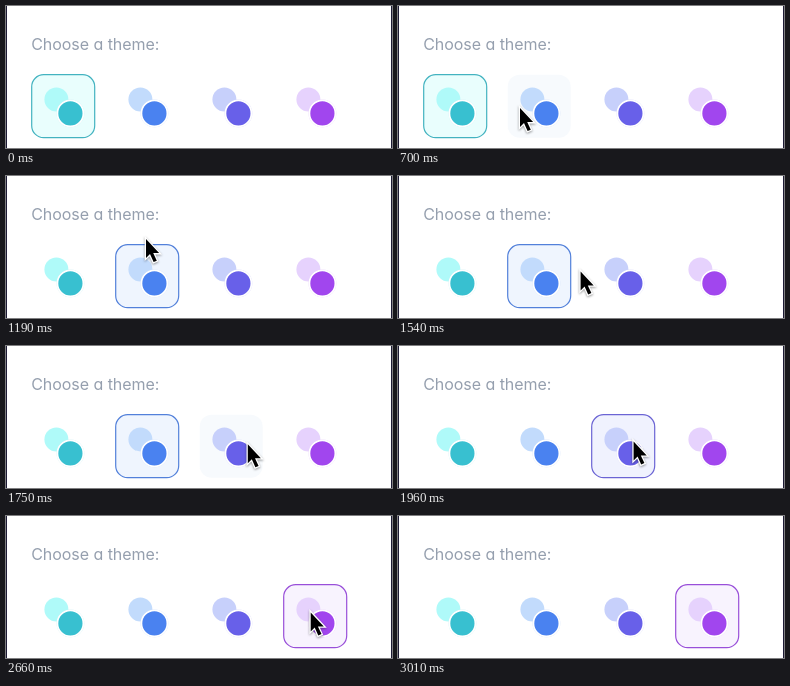
Animation of 386 by 142 pixels, one loop 3990 ms. Source, as an HTML page:

```html
<!DOCTYPE html>
<html lang="en">
<head>
<meta charset="utf-8">
<title>Theme picker</title>
<style>
  html, body { margin: 0; width: 100%; height: 100%; overflow: hidden; background: #fff; }
  svg { display: block; width: 386px; height: 142px; }
  text { font: 16px Inter, sans-serif; font-feature-settings: "cv11"; letter-spacing: -.05px; fill: #959fae; }
  .box { fill: none; }
  .hover .box { fill: #f7fafd; }
  .picked .box {
    fill: color-mix(in srgb, var(--pale) 27%, white);
    stroke: color-mix(in srgb, var(--dark) 82%, #777);
    stroke-width: 1.2;
  }
  .pale { fill: var(--pale); }
  .dark {
    fill: var(--dark); stroke: #fff; stroke-width: 1.8;
    filter: drop-shadow(.8px .8px .7px color-mix(in srgb, var(--dark) 30%, transparent));
  }
  #cursor { stroke: #fff; stroke-width: 2.6; paint-order: stroke; filter: drop-shadow(.5px 1px 1px #0006); }
</style>
</head>
<body>
<svg viewBox="0 0 386 142">
  <path d="M.5 0V142M385.5 0V142" stroke="#1d1b35"/>
  <text x="25.2" y="43.7">Choose a theme:</text>
  <g id="cards"></g>
  <path id="cursor" d="M0 0V19l4-3.9 3.6 8 3.2-1.4-3.6-7.6h5.9z"/>
</svg>
<script>
const LOOP = 3990, STEP = 70, GLIDE = 140;
const LEFT = 25.4, TOP = 68.4, SIZE = 63, PITCH = 84;
const themes = [['#affaf9', '#38c0d0'], ['#c2dbfc', '#4a82f0'], ['#c7d0fb', '#6860e9'], ['#e6d2fd', '#a146ee']];
const clicks = [1050, 1960, 2380];

// arrival time and tip of the pointer; it rests between glides
const stops = [
  [70, 215, 114], [140, 122, 102], [840, 141.5, 99],
  [1190, 140, 63], [1470, 140, 63], [1540, 182.6, 95.4], [1680, 248, 101], [1820, 235.6, 95.4],
  [2100, 260, 62], [2240, 307.7, 94.4],
  [2520, 312, 62], [2660, 304.7, 96.4], [2800, 283, 115], [2940, 258, 131]
];

const cursor = document.getElementById('cursor');
const cards = document.getElementById('cards');
cards.innerHTML = themes.map(([pale, dark], i) => `
  <g transform="translate(${LEFT + i * PITCH} ${TOP})" style="--pale:${pale};--dark:${dark}">
    <rect class="box" x=".3" y=".3" width="${SIZE}" height="${SIZE}" rx="12"/>
    <circle class="pale" cx="25" cy="25" r="12"/>
    <circle class="dark" cx="39" cy="39" r="13"/>
  </g>`).join('');

function pointer(t) {
  const next = stops.findIndex(([arrival]) => arrival >= t);
  if (next < 0 || t < stops[0][0]) return null;
  const [end, x, y] = stops[next];
  const [begin, x0, y0] = stops[Math.max(0, next - 1)];
  const span = Math.min(GLIDE, end - begin) || 1;
  const k = Math.max(0, 1 - (end - t) / span);
  return [x0 + (x - x0) * k, y0 + (y - y0) * k];
}

function draw(now) {
  const t = Math.floor(now % LOOP / STEP) * STEP;
  const tip = pointer(t);
  const picked = clicks.filter(click => click <= t).length;

  cursor.style.display = tip ? '' : 'none';
  if (tip) cursor.setAttribute('transform', `translate(${tip})`);

  [...cards.children].forEach((card, i) => {
    const inside = (value, from) => value >= from && value <= from + SIZE;
    const hover = tip && inside(tip[0], LEFT + i * PITCH) && inside(tip[1], TOP);
    card.setAttribute('class', i === picked ? 'picked' : hover ? 'hover' : '');
  });
  requestAnimationFrame(() => draw(performance.now() - start));
}

const start = performance.now();
draw(0);
</script>
</body>
</html>
```
